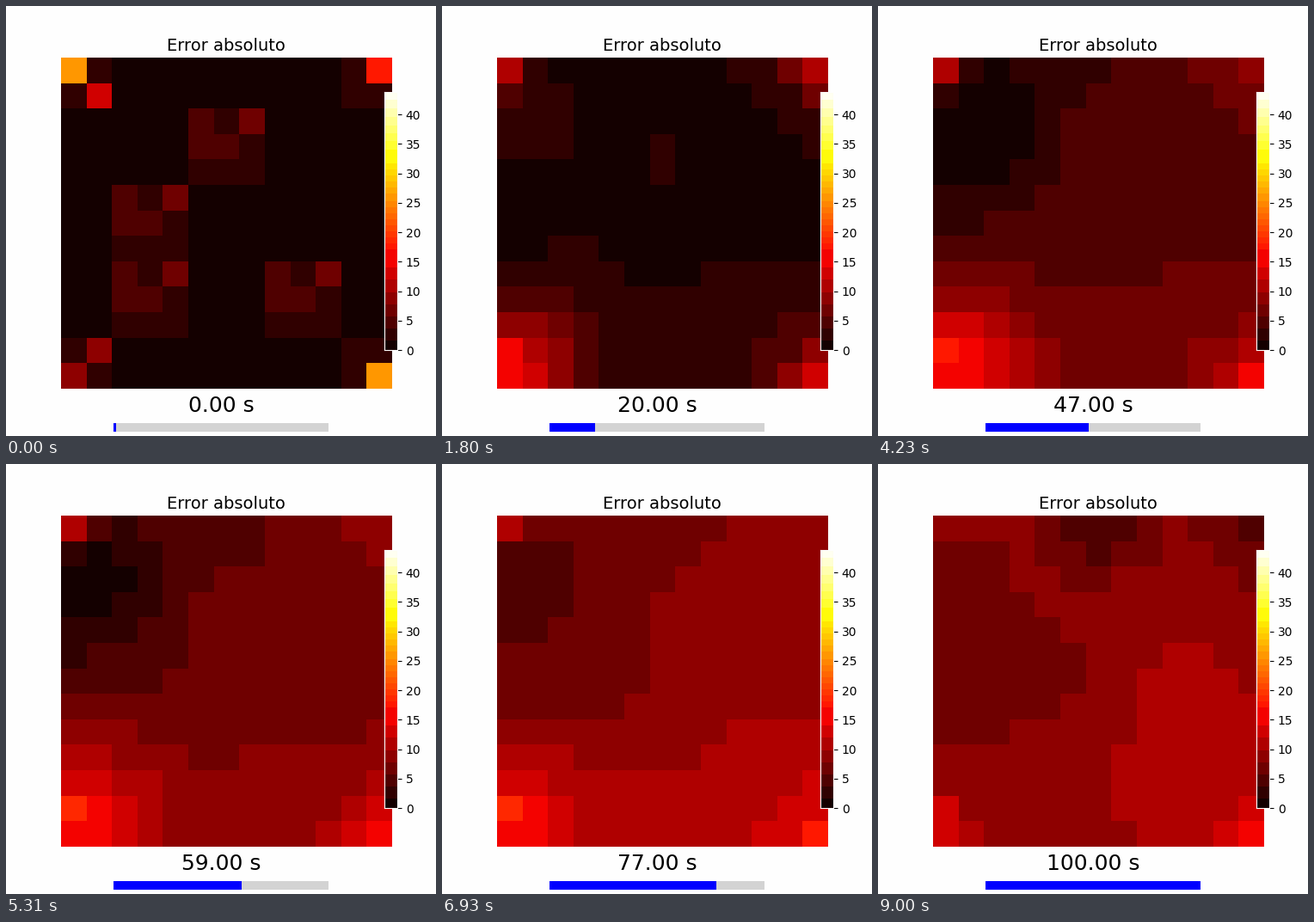
A matplotlib script for the animation above (9.09 s loop, 500 by 500 pixels).

```python
import matplotlib.pyplot as plt
import numpy as np
from matplotlib.animation import FuncAnimation
from matplotlib.colors import ListedColormap
from matplotlib.patches import Rectangle

N = 13
LAST = N - 1
FRAMES = 101
VMAX = 43.8
PAPER = "#fefefe"
ROW, COL = np.mgrid[:N, :N]
CHIPS = [(2, 5), (5, 2), (8, 2), (8, 8)]


def banded_hot():
    """Hot ramp cut into coarse bands: the ramp and the colour of each band."""
    rgb = np.floor(plt.get_cmap("hot")(np.arange(256))[:, :3] * 255)
    bins = rgb // [32, 16, 32]
    edges = np.any(np.diff(bins, axis=0) != 0, axis=1)
    band = np.concatenate([[0], np.cumsum(edges)])
    shades = np.array([rgb[band == k].mean(axis=0) for k in range(band[-1] + 1)]) / 255
    return shades[band], shades


def blob(row, col, spread):
    return np.exp(-((ROW - row) ** 2 + (COL - col) ** 2) / spread)


def spike(row, col, reach):
    return np.exp(-(abs(ROW - row) + abs(COL - col)) / reach)


def swing(t, span):
    return np.sin(np.pi * t / span)


def initial_error():
    grid = np.zeros((N, N))
    for row, col, level, inner in [(0, 0, 16, 6), (0, LAST, 8, 1),
                                   (LAST, 0, 4, 4), (LAST, LAST, 16, 1)]:
        r, c = min(row, LAST - 1), min(col, LAST - 1)
        grid[r:r + 2, c:c + 2] = 1
        grid[row, col] = level
        grid[abs(row - 1), abs(col - 1)] = inner
    for r, c in CHIPS:
        grid[r:r + 3, c:c + 3] = [[2, 1, 3], [2, 2, 1], [1, 1, 1]]
    return grid + 0.4


def plate_error(t):
    """Error over the plate, in colour bands."""
    # the plate drifts upward while a dip near the top left crosses zero
    base = 4.6 * np.sin(np.pi / 2 * t / 92) ** 2
    dip = np.interp(t, [0, 9, 32, 59, 100], [0, 0.9, 3.6, 3, 0.7])
    e = abs(base - dip * blob(2, 0.5, 9))

    # corners
    e += np.interp(t, [9, 40, 100], [4.2, 5.4, 0]) * spike(0, 0, 0.62)
    e += (6.3 - 0.083 * t) * spike(0, LAST, 1.65)
    e += (2.8 + 5.5 * np.exp(-t / 35)) * spike(LAST, LAST, 1.65)
    e += (7.25 - 0.058 * t) * blob(LAST, 0, 1 + 10 * max(swing(t, 100), 0))
    e += 1.6 * min(t / 30, 1) * spike(LAST - 1, 0, 0.2)

    # warm strip along the lower edge, and what is left of the chips
    e += 0.88 * swing(t, 110) * np.exp(-(ROW - 11) ** 2 / 8)
    for r, c in CHIPS:
        e += 1.45 * np.exp(-t / 25) * blob(r + 1.2, c + 0.5, 4)

    # slow patches that show towards the end
    for row, col, spread, size in [(6.5, 0, 6, -1.1), (6, 4.5, 8, -0.9),
                                   (7, 9, 12, 0.9), (0, 6, 3.5, -2.1)]:
        e += size * (t / 100) ** 2 * blob(row, col, spread)
    return e


ramp, shades = banded_hot()
START = initial_error()


def heat_map(t):
    fade = np.exp(-t / 1.5)
    e = START * fade + plate_error(t) * (1 - fade)
    return shades[np.clip(e, 0, len(shades) - 1).astype(int)]


plt.rcParams["font.family"] = "DejaVu Sans"
fig, ax = plt.subplots(figsize=(5, 5), dpi=100, facecolor=PAPER)
ax.axis("off")
ax.set_title("Error absoluto", fontsize=14)
heat = ax.imshow(heat_map(0), interpolation="nearest")

cax = fig.add_axes([0.88, 0.2, 0.03, 0.6])
cax.imshow(np.arange(256)[:, None], cmap=ListedColormap(ramp), origin="lower",
           extent=(0, 1, 0, VMAX), aspect="auto", interpolation="nearest")
cax.set_xticks([])
cax.set_yticks(range(0, 41, 5))
cax.yaxis.tick_right()
cax.tick_params(labelsize=10)
for spine in cax.spines.values():
    spine.set_color(PAPER)

clock = fig.text(0.5, 28 / 500, "", fontsize=18, ha="center", va="baseline")
fig.add_artist(Rectangle((0.25, 0.01), 0.5, 0.02, fc="lightgray", lw=0))
bar = fig.add_artist(Rectangle((0.25, 0.01), 0, 0.02, fc="blue", lw=0, zorder=2))


def update(t):
    heat.set_data(heat_map(t))
    clock.set_text(f"{t:.2f} s")
    bar.set_width(0.5 * min((t + 1.35) / FRAMES, 1))
    return heat, clock, bar


anim = FuncAnimation(fig, update, frames=FRAMES, interval=90, repeat=True)
plt.show()
```
